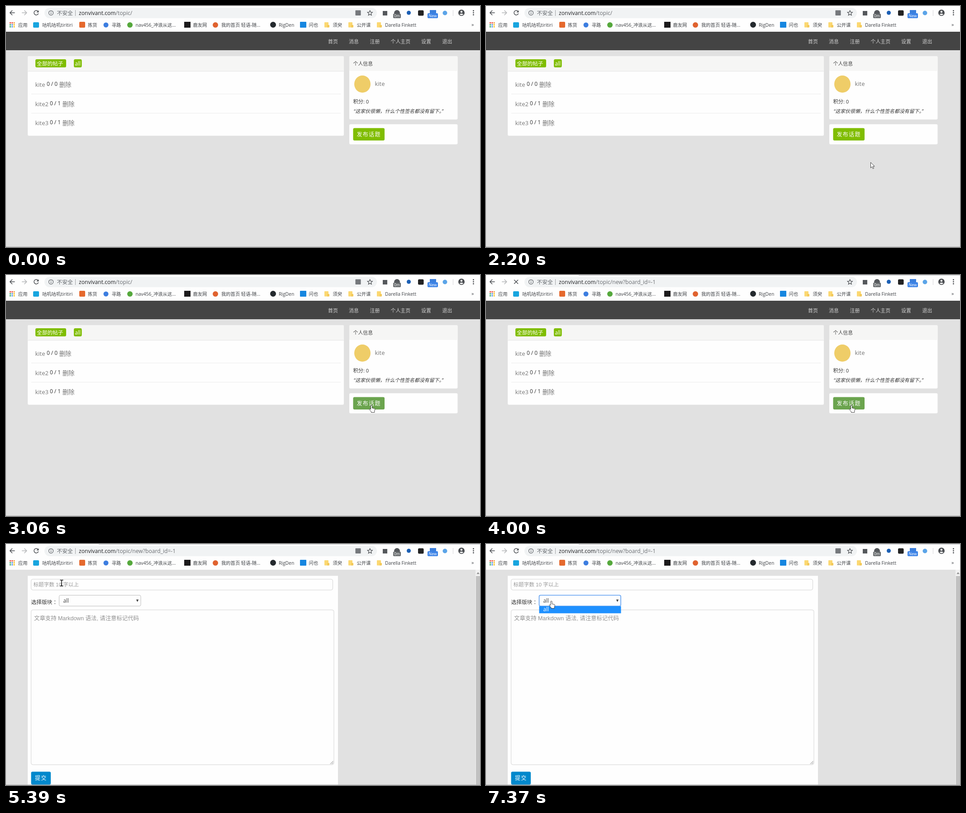
An HTML page that plays this animation: 1048x534 px, repeating every 8 s.

```html
<!DOCTYPE html>
<html lang="zh-CN">
<head>
<meta charset="utf-8">
<title>发布话题</title>
<style>
html, body { margin: 0; width: 100%; height: 100%; overflow: hidden; background: #e1e1e1; }
svg { display: block; width: 1048px; height: 534px; }
text { font-family: "Open Sans", "Noto Sans CJK SC", "Noto Sans CJK", sans-serif; white-space: pre; }
.arial { font-family: "Liberation Sans", "Noto Sans CJK SC", "Noto Sans CJK", sans-serif; }
.cursor { stroke: #333; stroke-width: .9; stroke-linejoin: round; fill: #fff; }
</style>
</head>
<body>
<svg id="stage" viewBox="0 0 1048 534" xmlns="http://www.w3.org/2000/svg"></svg>
<script>
const LOOP = 8000;
const GREEN = [128, 189, 1], HOVER = [107, 164, 78], PRESSED = [98, 154, 70];
const PAPER = '#fefefe', BORDER = '#d3d3d3';
const rgb = c => `rgb(${c.map(Math.round)})`;

const rect = (x, y, w, h, fill, r = 0, more = '') =>
  `<rect x="${x}" y="${y}" width="${w}" height="${h}" rx="${r}" fill="${fill}" ${more}/>`;
const frame = (x, y, w, h, stroke, r = 3, more = '') =>
  rect(x + .5, y + .5, w - 1, h - 1, PAPER, r, `stroke="${stroke}" ${more}`);
const disc = (x, y, r, fill) => `<circle cx="${x}" cy="${y}" r="${r}" fill="${fill}"/>`;
const line = (d, stroke, w = 1.5) =>
  `<path d="${d}" fill="none" stroke="${stroke}" stroke-width="${w}"/>`;
const text = (x, y, size, fill, str, more = '') =>
  `<text x="${x}" y="${y}" font-size="${size}" fill="${fill}" ${more}>${str}</text>`;
const group = (id, ...parts) => `<g id="${id}">${parts.join('')}</g>`;

function appsIcon() {
  const colors = ['#ea4335', '#ea4335', '#f29a2e', '#34a853', '#4285f4', '#fbbc05', '#34a853', '#4285f4', '#fbbc05'];
  return colors.map((c, i) => rect(8 + i % 3 * 4.3, 36 + Math.floor(i / 3) * 4.3, 2.8, 2.8, c)).join('');
}

function folder(x) {
  return rect(x, 36, 9, 11.5, '#fbd872', 1) + rect(x + 6, 42, 5, 5.5, '#f3c95a', 1);
}

function toolbar() {
  const ink = '#4a4d51';
  return [
    rect(0, 0, 1048, 57, PAPER),
    rect(85, 4, 735, 23, '#f1f3f4', 11.5),
    line('M19.5 15H9M14 9.8L8.8 15L14 20.2', ink),
    line('M35 15H45.5M40.5 9.8L45.7 15L40.5 20.2', '#b4b6b8'),
    group('reload', line('M70.8 11.8A5 5 0 1 0 71.6 16.6', ink),
      `<path d="M72.3 9.5V14.2H67.6Z" fill="${ink}"/>`),
    group('stop', line('M62.2 10.7L71 19.5M71 10.7L62.2 19.5', ink)),
    line('M94.5 15.3a5 5 0 1 0 10 0a5 5 0 1 0 -10 0M99.5 14.5V18M99.5 12V13.3', '#5f6368', 1.2),
    text(112.5, 19.5, 11.8, '#5f6368', '不安全'),
    rect(153, 9, 1, 13, '#9fa1a4'),
    text(161, 19.6, 12.1, '#6b6e72',
      '<tspan fill="#202124">zonvivant.com</tspan>/topic/<tspan id="query">new?board_id=-1</tspan>'),
    group('translate', rect(772.5, 9.5, 12, 11.5, '#75787c', 1)),
    line('M804.7 10L806.2 13.7L810.2 14L807.1 16.6L808.1 20.5L804.7 18.4L801.3 20.5L802.3 16.6L799.2 14L803.2 13.7Z', ink, 1.2),
    rect(833, 11, 10, 10, '#55585c'),
    disc(864.5, 15.5, 6.5, '#55585c'),
    rect(856, 17, 17, 10, '#666a6c', 2),
    text(864.5, 25.2, 8.6, '#fff', '0m', 'text-anchor="middle"'),
    disc(890.5, 15, 4.5, '#1b5fb4'),
    rect(911, 9.5, 12.5, 12, '#222', 2.5),
    rect(937, 9, 14, 9, '#3b7fdc'),
    rect(932, 16, 23, 11, '#3b82e6', 2),
    text(943.5, 24.8, 8.6, '#fff', 'New', 'text-anchor="middle"'),
    disc(970.5, 15.5, 5, '#5ba4e8'),
    rect(988, 9, 1, 13, '#d5d7d9'),
    disc(1007, 15, 7, ink), disc(1007, 12.7, 2.2, '#fff'),
    '<path d="M1002.6 18.6Q1007 14.8 1011.4 18.6Q1007 22.2 1002.6 18.6Z" fill="#fff"/>',
    ...[10.5, 15, 19.5].map(y => disc(1033.5, y, 1.4, ink))
  ].join('');
}

function bookmarks() {
  const labels = [
    [27, '应用'], [80, '咕叽咕叽tiritiri'], [181, '拣货'], [233.5, '寻路'], [286.5, 'nav456_冲浪从这...'],
    [413.5, '鹿友网'], [476, '我的首页 轻语-随...'], [603, 'RigDen'], [669.5, '问也'],
    [722.5, '须臾'], [775.5, '公开课'], [838, 'Darella Finkett']
  ];
  return [
    appsIcon(),
    rect(60, 36, 13, 12, '#18a5df', 2),
    rect(162, 35, 13, 13, '#e5692d', 2),
    disc(221, 42, 5.5, '#3c7de0'),
    disc(274, 42, 6, '#55a83c'),
    rect(394, 35, 14, 13, '#1c1a1b'),
    disc(463, 42, 6, '#e0622f'),
    disc(590.5, 41.5, 6.5, '#24292e'),
    rect(650, 35, 14, 13, '#1686e0', 1),
    folder(704), folder(757), folder(820),
    ...labels.map(([x, s]) => text(x, 45.8, 10.3, '#3f4246', s)),
    text(1029, 45, 11, '#4a4d51', '»')
  ].join('');
}

function topicRow(i, name, count, x) {
  const y = 179.3 + i * 42.3;
  return text(64.5, y, 13, '#777', name) + text(x, y - 2.1, 11.8, '#333', count) +
    text(x + 27.7, y, 13.4, '#777', '删除');
}

function listPage() {
  const nav = [[712, '首页'], [758, '消息'], [804.5, '注册'], [850.5, '个人主页'], [918, '设置'], [964.5, '退出']];
  return group('list',
    rect(0, 57, 1048, 477, '#e1e1e1'),
    rect(0, 57, 1048, 41, '#444'),
    ...nav.map(([x, s]) => text(x, 82.8, 10.9, '#d2d2d2', s)),
    rect(48, 111, 699, 176.5, PAPER, 3),
    rect(48, 111, 699, 33, '#f6f6f5', 3),
    rect(48, 144, 699, 1, '#e3e3e3'),
    rect(65, 118, 68, 18, rgb(GREEN), 3),
    text(68, 132, 11.7, '#fff', '全部的帖子'),
    rect(150, 118, 17.5, 18, rgb(GREEN), 3),
    text(152.3, 132, 12, '#fff', 'all'),
    topicRow(0, 'kite', '0 / 0', 90),
    topicRow(1, 'kite2', '0 / 1', 97),
    topicRow(2, 'kite3', '0 / 1', 97),
    rect(56, 194.5, 684, 1, '#ececec'),
    rect(56, 237, 684, 1, '#ececec'),
    rect(759, 111, 239.5, 140.5, PAPER, 3),
    rect(759, 111, 239.5, 33, '#f6f6f5', 3),
    text(767.5, 132, 10.9, '#444', '个人信息'),
    '<ellipse cx="788" cy="173" rx="18" ry="19" fill="#efcd68"/>',
    text(815.5, 177, 13, '#777', 'kite'),
    text(767.5, 215.5, 11.2, '#333', '积分: 0'),
    text(768.5, 237.2, 10.9, '#333', '“这家伙很懒，什么个性签名都没有留下。”', 'font-style="italic"'),
    rect(759, 262, 239.5, 44.5, PAPER, 3),
    rect(767.5, 270.5, 69.5, 27.5, rgb(GREEN), 3, 'id="post"'),
    text(775.5, 289.3, 12, '#fff', '发布话题', 'letter-spacing="1.3"'));
}

function formPage() {
  return group('form',
    rect(0, 57, 1048, 477, '#e1e1e1'),
    rect(48, 70.5, 686, 464, PAPER),
    frame(55, 77.5, 668, 25, BORDER, 4),
    text(60.5, 94.2, 11.6, '#999', '标题字数 10 字以上', 'class="arial"'),
    rect(61, 84, 1, 13, '#777', 0, 'id="caret"'),
    text(55.5, 133, 11.7, '#333', '选择版块<tspan dx="3">：</tspan>'),
    frame(117, 113, 181.5, 25, '#bbb', 3, 'id="select"'),
    text(126.5, 130, 11.8, '#444', 'all'),
    '<path d="M287.8 123H293.2L290.5 128.5Z" fill="#444"/>',
    frame(55, 145.5, 670.5, 344, BORDER, 4),
    line('M717 487.5L723.5 481M720.5 487.5L723.5 484.5', '#777', 1),
    text(62, 168.6, 12.4, '#8f8f8f', '文章支持 Markdown 语法, 请注意标记代码', 'class="arial"'),
    rect(55.5, 504.5, 43.5, 28.5, '#0088cc', 3),
    text(64, 523, 12, '#fff', '提交', 'letter-spacing="1.3"'),
    rect(1038, 57, 10, 477, '#f1f1f1'),
    rect(1039, 71, 9, 463, '#c1c1c1'),
    '<path d="M1040.5 66.5H1047L1043.7 62.5Z" fill="#8a8a8a"/>',
    group('menu', rect(117.5, 138, 181, 15.5, '#1e90ff'), text(126.5, 148.7, 11.8, '#fff', 'all')));
}

const cursors = {
  arrow: '<path class="cursor" d="M.5 .5V12.8L3.4 10L5.4 14.5L7.5 13.6L5.5 9.2H9.2Z"/>',
  hand: '<path class="cursor" d="M-1.5 10V1.9a1.5 1.5 0 0 1 3 0V6.8L6.5 7.8Q8 8.3 7.7 10.2L6.7 14.2V16.5H-.5V15L-4.4 10.3Q-4.8 8.2 -2.8 8.6Z"/>',
  beam: line('M-3.5 -6.5H-1Q0 -6.5 0 -5.5Q0 -6.5 1 -6.5H3.5M0 -5.5V5.5M-3.5 6.5H-1Q0 6.5 0 5.5Q0 6.5 1 6.5H3.5', '#111')
};

const stage = document.getElementById('stage');
stage.innerHTML = listPage() + formPage() + toolbar() + bookmarks() +
  rect(205, 0, 843, 1, '#bfc1c4', 0, 'id="edge"') +
  rect(0, 533, 1048, 1, '#b9b9b9') +
  Object.entries(cursors).map(([id, shape]) => group(id, shape)).join('');

const el = id => document.getElementById(id);
const show = (id, on) => el(id).setAttribute('display', on ? 'inline' : 'none');

// Pointer strokes: start, end, number of steps, points along the way.
const moves = [
  [1380, 2140, 12, [[972, 526], [918, 452], [880, 392], [857, 349]]],
  [2200, 3000, 14, [[850, 346], [838, 328], [818, 304], [808, 288]]],
  [4800, 4920, 3, [[792, 290], [764, 285], [728, 278]]],
  [5060, 5390, 6, [[560, 222], [330, 146], [170, 94], [123, 86.5]]],
  [5510, 5860, 6, [[122, 86], [120, 86], [122, 87]]],
  [5910, 6590, 11, [[123, 88], [128, 97], [137, 113], [144.5, 126]]]
];

function pointerAt(t) {
  const move = moves.filter(m => t >= m[0]).pop();
  if (!move) return null;
  const [start, end, steps, pts] = move;
  const k = Math.min(steps - 1, Math.floor((t - start) / (end - start) * (steps - 1) + 1e-6));
  const p = k / (steps - 1) * (pts.length - 1);
  const i = Math.min(pts.length - 2, Math.floor(p));
  return pts[i].map((v, a) => v + (pts[i + 1][a] - v) * (p - i));
}

function cursorKind(t, [x, y]) {
  if (t < 4470) return x < 837 && y < 298 ? 'hand' : 'arrow';
  if (t < 4800) return 'hand';
  if (x > 725) return 'arrow';
  if (t < 5910 || y < 102) return 'beam';
  return y < 113 ? 'arrow' : 'hand';
}

function postColor(t) {
  if (t >= 3700 && t < 3860) return PRESSED;
  const p = Math.max(0, Math.min(1, (t - 2820) / 240));
  return GREEN.map((v, i) => v + (HOVER[i] - v) * p);
}

function draw(t) {
  const onForm = t >= 4470, loading = t >= 3780 && !onForm, focused = t >= 7290;
  show('list', !onForm);
  show('form', onForm);
  show('reload', !loading);
  show('stop', loading);
  show('edge', t >= 3780);
  show('translate', t < 4000 || onForm);
  el('query').style.visibility = t >= 4000 ? 'visible' : 'hidden';
  el('post').setAttribute('fill', rgb(postColor(t)));
  show('caret', onForm && !focused && (t - 4470) % 1036 < 518);
  el('select').setAttribute('stroke', focused ? '#5a9df0' : '#bbb');
  el('select').setAttribute('stroke-width', focused ? 1.6 : 1);
  show('menu', t >= 7370);

  const pos = pointerAt(t), kind = pos && cursorKind(t, pos);
  for (const id in cursors) show(id, id === kind);
  if (kind) el(kind).setAttribute('transform', `translate(${pos.map(v => v.toFixed(1))})`);
}

const begin = performance.now();
function tick() {
  draw((performance.now() - begin) % LOOP);
  requestAnimationFrame(tick);
}
tick();
</script>
</body>
</html>
```
